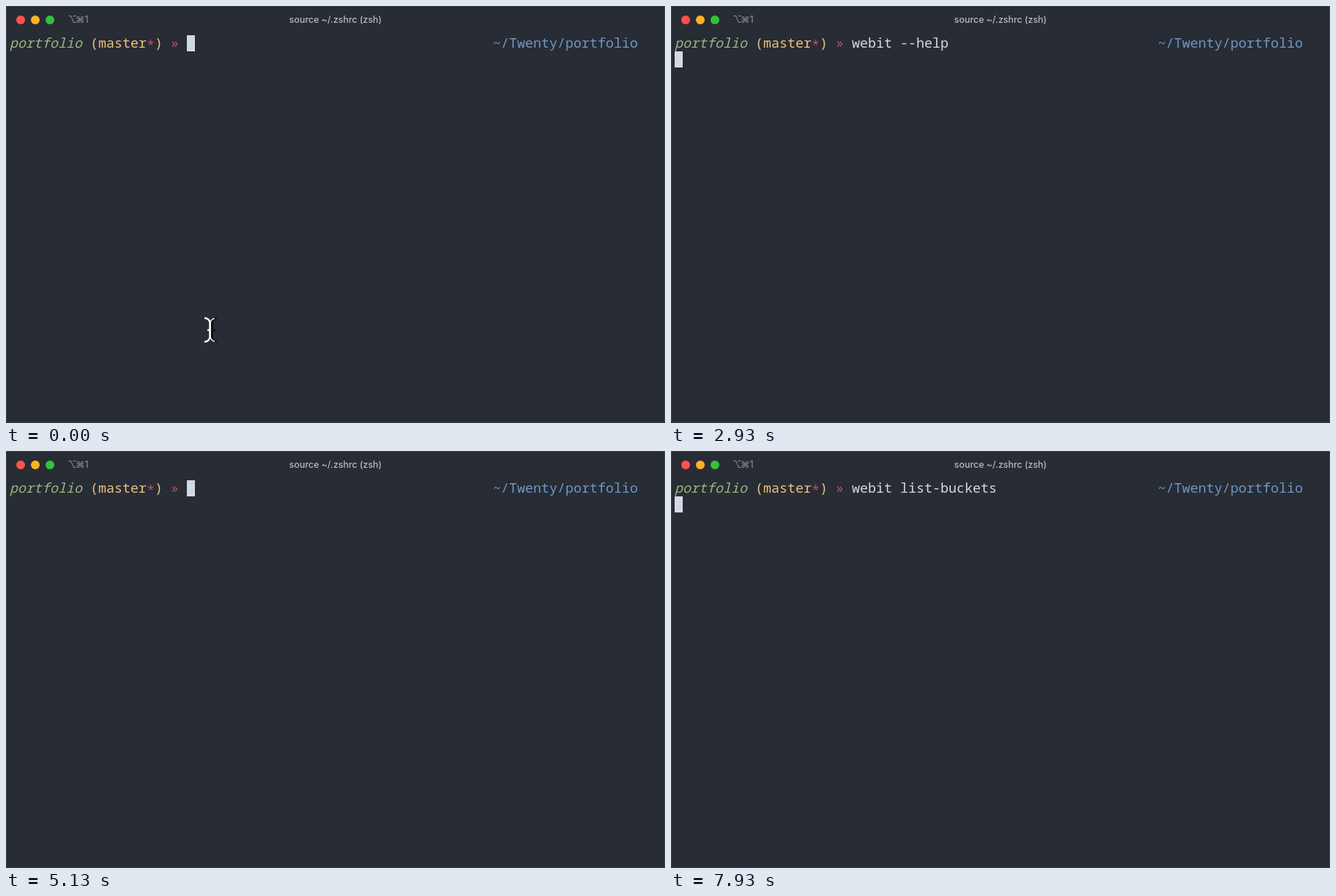
An HTML page with a canvas that plays this animation: 900x570 px, repeating every 8 s.

```html
<!DOCTYPE html>
<html lang="en">
<head>
<meta charset="utf-8">
<title>Terminal</title>
<style>
  html, body { margin: 0; width: 100%; height: 100%; overflow: hidden; background: #282c35; }
  canvas { display: block; width: 900px; height: 570px; }
</style>
</head>
<body>
<canvas id="stage" width="900" height="570"></canvas>
<script>
const ctx = document.getElementById('stage').getContext('2d');
const LOOP = 8000, CELL = 11, ROW = 22, LEFT = 5, TOP = 40, PROMPT_COLS = 22;
const MONO = '500 18.333px "Noto Sans Mono", "DejaVu Sans Mono", monospace';
const UI = '500 12.4px Inter, "DejaVu Sans", sans-serif';
const C = {
  bg: '#282c35', edge: '#3b3f48', text: '#d4d9e4', cursor: '#d3d8e5',
  green: '#99b780', yellow: '#eac27b', red: '#bd535d', blue: '#7097c2',
  title: '#b8babf', badge: '#83868d'
};

// Each command: its key times, and when enter, output, new prompt and clear happen.
const runs = [
  { text: 'webit --help',
    keys: [270, 330, 730, 870, 930, 1070, 1670, 1800, 2000, 2270, 2270, 2470],
    enter: 2730, output: 3070, prompt: 3130, clear: 4870 },
  { text: 'webit list-buckets',
    keys: [5470, 5530, 5800, 5930, 6000, 6070, 6330, 6400, 6470, 6600,
           6800, 6930, 7000, 7200, 7270, 7400, 7530, 7600],
    enter: 7870, output: Infinity, prompt: Infinity, clear: Infinity }
];

const help = `Usage: webit [OPTIONS] COMMAND [ARGS]...

  WebIt deploys websites to AWS

Options:
  --profile TEXT  Use a given AWS profile
  --help          Show this message and exit.

Commands:
  find-cert            Find a certificate from DOMAIN
  list-bucket-objects  List objects in an S3 bucket
  list-buckets         List all S3 buckets
  setup-bucket         Create and configure S3 bucket
  setup-cdn            Set up CloudFront CDN for DOMAIN pointing to BUCKET
  setup-domain         Configure DOMAIN to point to the corresponding bucket
  sync                 Sync contents of PATHNAME to BUCKET`.split('\n');

function put(text, col, row, color = C.text, dy = 0) {
  ctx.fillStyle = color;
  ctx.fillText(text, LEFT + col * CELL, TOP + row * ROW + 17 + dy);
}

function block(col, row) {
  ctx.fillStyle = C.cursor;
  ctx.fillRect(LEFT + col * CELL, TOP + row * ROW, CELL, ROW);
}

function prompt(row) {
  ctx.font = 'italic ' + MONO;
  put('portfolio', 0, row, C.green);
  ctx.font = MONO;
  put('(master', 10, row, C.yellow);
  put('*', 17, row, C.red, 3);
  put(')', 18, row, C.yellow);
  put('»', 20, row, C.red);
  put('~/Twenty/portfolio', 60, row, C.blue);
}

function stroke(path, color, width) {
  ctx.strokeStyle = color;
  ctx.lineWidth = width;
  ctx.stroke(new Path2D(path));
}

function chrome() {
  ctx.fillStyle = C.bg;
  ctx.fillRect(0, 0, 900, 570);
  stroke('M.5 0V565Q.5 569.5 5 569.5H895Q899.5 569.5 899.5 565V0M0 .5H900', C.edge, 1);
  ['#fe524c', '#fdb125', '#32c338'].forEach((color, i) => {
    ctx.fillStyle = color;
    ctx.beginPath();
    ctx.arc(20 + 20 * i, 19, 6, 0, Math.PI * 2);
    ctx.fill();
  });
  ctx.font = UI;
  ctx.textAlign = 'center';
  ctx.fillStyle = C.title;
  ctx.fillText('source ~/.zshrc (zsh)', 450, 23);
  ctx.fillStyle = C.badge;
  ctx.fillText('⌥', 90.5, 23);
  ctx.fillText('⌘', 101.5, 23);
  ctx.fillText('1', 110, 23);
  ctx.textAlign = 'left';
}

function pointer() {
  ctx.lineCap = 'butt';
  stroke('M288 426Q282 427 281.5 433V452Q282 458 288 459M275 443H286', '#0c0d10', 2.6);
  stroke('M285 427Q280 428 279 433V452Q280 457 285 458.5', '#e9eaec', 1.4);
  stroke('M271 426.5Q278 427 278.5 433V452Q278 458.5 271 459M275 443H280', '#ffffff', 2.4);
}

function draw(t) {
  const run = runs.find(r => t < r.clear);
  const typed = run.keys.filter(k => k <= t).length;
  chrome();
  prompt(0);
  put(run.text.slice(0, typed), PROMPT_COLS, 0);
  if (t >= run.output) help.forEach((line, i) => put(line, 0, i + 1));

  const end = help.length + 1;
  if (t >= run.prompt) {
    prompt(end);
    block(PROMPT_COLS, end);
  } else if (t >= run.output) block(0, end);
  else if (t >= run.enter) block(0, 1);
  else block(PROMPT_COLS + typed, 0);

  if (t < runs[0].keys[0]) pointer();
}

const start = performance.now();
function tick() {
  draw((performance.now() - start) % LOOP);
  requestAnimationFrame(tick);
}
tick();
</script>
</body>
</html>
```
